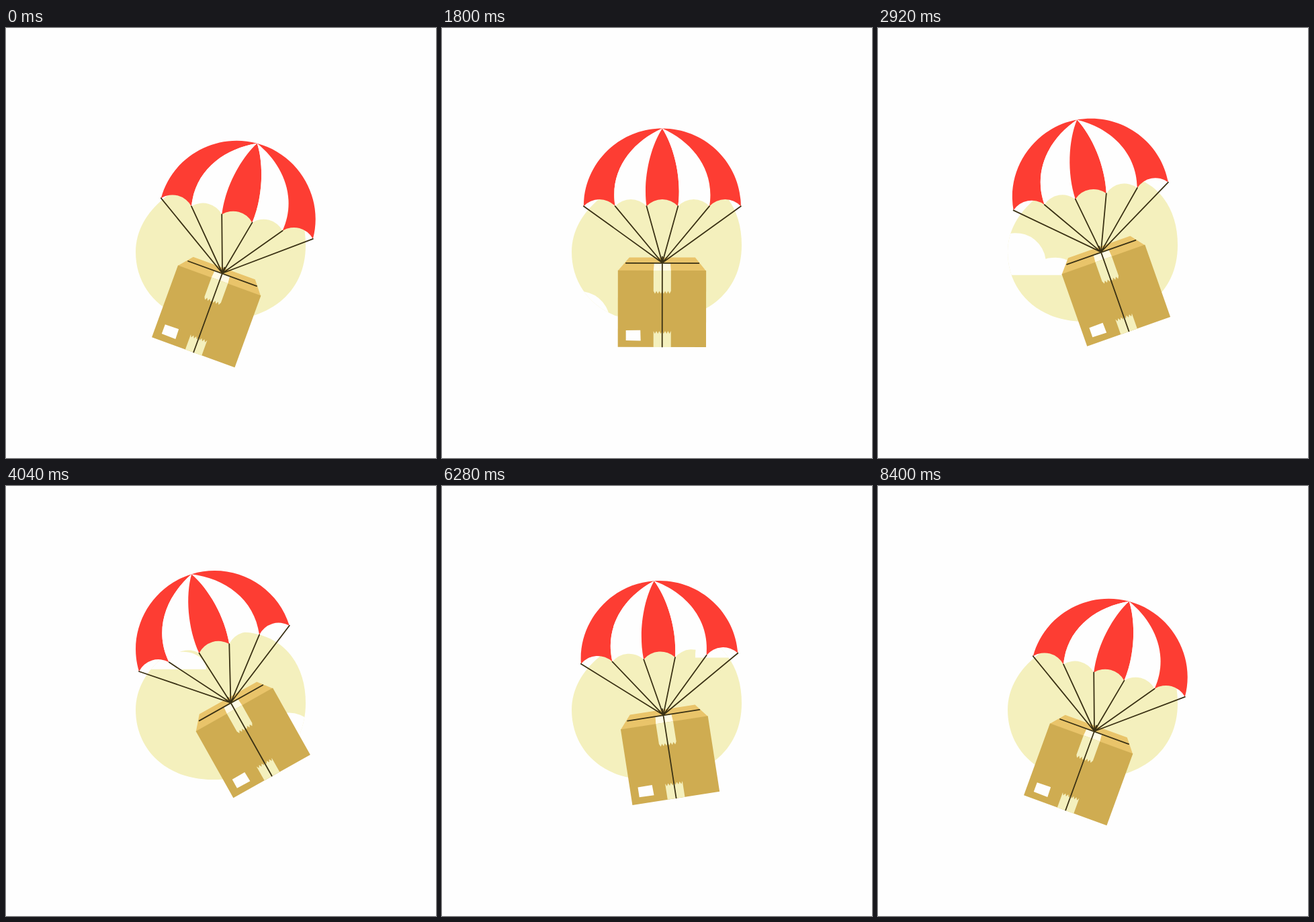
These frames come from a looping animation (640 by 640 pixels, 8440 ms). An HTML page:

```html
<!DOCTYPE html>
<html lang="en">
<head>
<meta charset="utf-8">
<title>Parachute delivery</title>
<style>
  html, body { margin: 0; width: 100%; height: 100%; overflow: hidden; background: #fefefe; }
  svg { display: block; width: 100vw; height: 100vh; }
  .cream { fill: #f4f0bd; }
  .white { fill: #fefefe; }
  .red { fill: #fd3d33; }
  .rope { fill: none; stroke: #3a3114; stroke-width: 1.8; stroke-linecap: round; }
</style>
</head>
<body>
<svg viewBox="0 0 640 640">
  <defs>
    <path id="blob" d="M193 333C193 270 262 217 345 217C408 217 446 260 446 323C446 396 390 437 308 437C238 437 193 392 193 333Z"/>
    <clipPath id="sky"><use href="#blob"/></clipPath>
  </defs>
  <use href="#blob" class="cream"/>
  <g clip-path="url(#sky)" class="white">
    <path id="cloudA" d="M150 19V0H160A45 45 0 0 1 249.500 -5Q256 -7 264 -7C283 -7 298 5 298 19Z"/>
    <path id="cloudB" d="M377 6V0A44 44 0 0 1 465 0V6Z"/>
  </g>
  <g id="box">
    <path fill="#e9c46a" d="M-66 12L-49 -8H49L65 12Z"/>
    <path fill="#cfac51" d="M-66 11.500H65.300V125.500H-66Z"/>
    <path fill="#fffbe6" d="M-12 0H12L13 11.500H-13Z"/>
    <path id="tapeTop" class="cream"/>
    <path id="tapeLow" class="cream"/>
    <path class="white" d="M-54 100.700L-32.500 100.300L-32 116L-54 115.500Z"/>
    <path class="rope" stroke-width="2" d="M-54 .5H54.500M0 -9V125"/>
  </g>
  <g id="chute">
    <g id="gores"></g>
    <path id="ropes" class="rope"/>
  </g>
</svg>
<script>
const $ = id => document.getElementById(id);

// Canopy, relative to the knot: six seams run from the top to the hem
const TOP = -200, HEM = -84.3;
const bends = [['64.6 -200', '117 -147.6'], ['45 -180', '79 -138'], ['18 -172', '29 -125']];
const hemX = i => -117 + 46.8 * i;

function seam(i) {
  const left = i < 3;
  const [a, b] = bends[left ? i : 5 - i].map(p => (left ? '-' : '') + p);
  return {
    down: `C${a} ${b} ${hemX(i)} ${HEM}`,
    up: `C${b} ${a} 0 ${TOP}`
  };
}

let gores = '', ropes = '';
for (let i = 0; i < 6; i++) {
  ropes += `M${hemX(i)} ${HEM}L0 0`;
  if (i === 5) break;
  const hem = `A32 32 0 0 1 ${hemX(i + 1)} ${HEM}`;
  const color = i % 2 ? 'white' : 'red';
  gores += `<path class="${color}" d="M0 ${TOP}${seam(i).down}${hem}${seam(i + 1).up}Z"/>`;
}
$('gores').innerHTML = gores;
$('ropes').setAttribute('d', ropes);

// Tape strip, torn at y and straight at base
function tape(y, base) {
  let d = `M-13 ${base}`;
  for (let i = 0; i <= 12; i++) d += `L${-13 + i * 26 / 12} ${y + i % 2 * 4}`;
  return d + `V${base}Z`;
}
$('tapeTop').setAttribute('d', tape(42, 11.5));
$('tapeLow').setAttribute('d', tape(101.5, 125.5));

const LOOP = 8440, CYCLE = 8400, STEP = 112;

const smooth = u => u * u * (3 - 2 * u);

// Swings out from a to b until turn, then back; push speeds up the way out,
// early for a low power and late for a high one
function swing(t, a, b, turn, push = 0, power = 1) {
  const u = t / turn;
  const p = u < 1
    ? smooth(u) + push * u ** power * (1 - u) ** 2
    : 1 - smooth((t - turn) / (CYCLE - turn));
  return a + (b - a) * p;
}

function draw(t) {
  const x = swing(t, 322, 334.8, 4540, .78);
  const y = swing(t, 365, 321.5, 4440);
  const move = (id, x, y, angle = 0) =>
    $(id).setAttribute('transform', `translate(${x} ${y}) rotate(${angle})`);
  move('chute', x, y, swing(t, 15, -17.8, 4540, .78));
  move('box', x, y, swing(t, 20, -30, 4540, 2.4, 3));

  const s = (t - 2920) / 1120;
  move('cloudA', 0, 348 - 91 * s - 4 * s * s);
  move('cloudB', 0, 447 - 66 * s);
}

// The picture moves in steps of 112 ms, shown on a 20 ms clock
const start = performance.now();
function tick() {
  const t = (performance.now() - start) % LOOP;
  const shown = Math.floor(t / 20) * 20;
  draw(Math.floor(shown / STEP) * STEP % CYCLE);
  requestAnimationFrame(tick);
}
tick();
</script>
</body>
</html>
```
